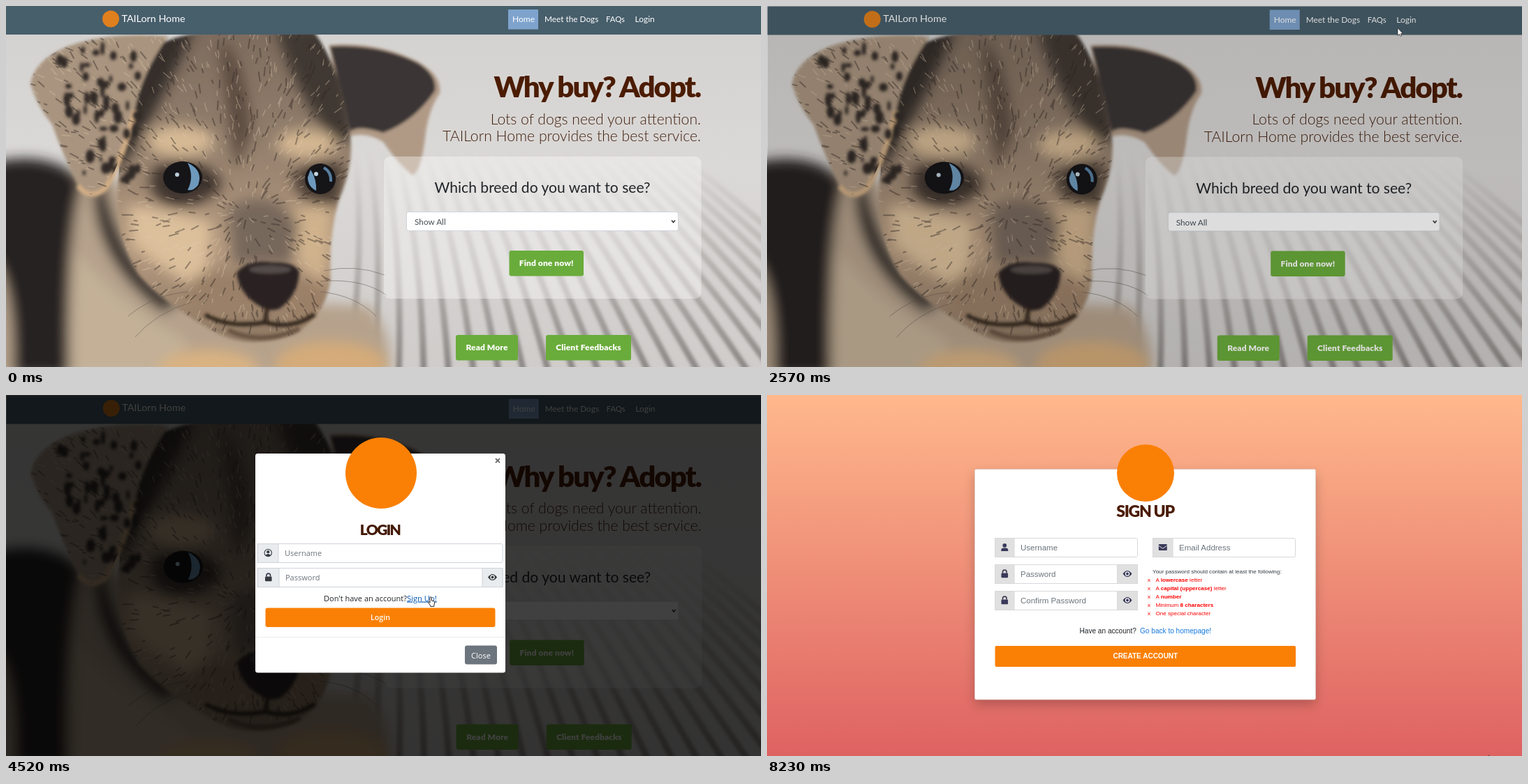
These frames come from a looping animation (1081 by 518 pixels, 8380 ms). An HTML page:

```html
<!DOCTYPE html>
<html lang="en">
<head>
<meta charset="utf-8">
<title>Dog adoption: log in and sign up</title>
<style>
html, body { margin: 0; width: 100%; height: 100%; overflow: hidden; background: #fff; }
svg { display: block; width: 100vw; height: 100vh; }
text { white-space: pre; }
.lato { font-family: Lato, sans-serif; }
.open { font-family: "Open Sans", "Noto Sans", sans-serif; font-size: 11px; }
.arial { font-family: "Liberation Sans", Arial, sans-serif; }
.mid { text-anchor: middle; }
.end { text-anchor: end; }
.black { font-weight: 900; }
</style>
</head>
<body>
<svg viewBox="0 0 1081 518" preserveAspectRatio="none">
  <defs>
    <linearGradient id="sunset" x2="0" y2="1"><stop stop-color="#ffb88c"/><stop offset="1" stop-color="#de6262"/></linearGradient>
    <linearGradient id="wall" x2="0" y2="1"><stop stop-color="#d3d1cf"/><stop offset=".45" stop-color="#dbd9d7"/><stop offset="1" stop-color="#cfccca"/></linearGradient>
    <linearGradient id="ridge" gradientUnits="userSpaceOnUse" x1="0" y1="210" x2="0" y2="518"><stop stop-color="#8d8783" stop-opacity="0"/><stop offset=".5" stop-color="#8d8783" stop-opacity=".4"/><stop offset="1" stop-color="#77716e" stop-opacity=".75"/></linearGradient>
    <linearGradient id="face" x2="0" y2="1"><stop stop-color="#7d6c5e"/><stop offset=".35" stop-color="#927e6c"/><stop offset=".7" stop-color="#b59a7f"/><stop offset="1" stop-color="#8d7763"/></linearGradient>
    <filter id="soft"><feGaussianBlur stdDeviation="2"/></filter>
    <filter id="haze" x="-30%" y="-30%" width="160%" height="160%"><feGaussianBlur stdDeviation="9"/></filter>
    <filter id="drop" x="-10%" y="-10%" width="120%" height="125%"><feDropShadow dx="0" dy="7" stdDeviation="8" flood-opacity=".22"/></filter>
    <path id="head" d="M205 62Q250 38 300 36H440Q480 90 492 180Q500 225 476 280Q462 330 465 390Q460 440 415 470Q350 495 300 468Q230 430 190 385Q150 320 162 240Q170 120 205 62Z"/>
    <path id="earL" d="M232 44Q150 36 88 58Q40 78 35 112Q45 145 66 170Q80 210 103 258Q120 280 142 262Q170 215 184 150Q195 95 232 44Z"/>
    <path id="earR" d="M462 56Q530 50 590 80Q625 100 621 125Q604 150 600 190Q594 238 582 243Q560 225 540 195Q515 180 493 187Q475 120 462 56Z"/>
    <clipPath id="fur"><use href="#head"/><use href="#earL"/></clipPath>
    <g id="person"><circle cy="-2.7" r="2.9"/><path d="M-5 5.5V4A3.5 3 0 0 1-1.5 1H1.5A3.5 3 0 0 1 5 4V5.5Z"/></g>
    <g id="badge"><circle r="5.2" fill="none" stroke="#343a40" stroke-width="1.1"/><circle cy="-1.3" r="2.1"/><path d="M-3.8 3.5Q0-.5 3.8 3.5Q0 7 -3.8 3.5Z"/></g>
    <g id="lock"><rect x="-4.8" y="-1" width="9.6" height="6.8" rx="1"/><path d="M-2.8-1V-2.6A2.8 2.8 0 0 1 2.8-2.6V-1" fill="none" stroke="#3c3c52" stroke-width="1.6"/></g>
    <g id="eye"><path d="M-6.5 0Q0-9 6.5 0Q0 9-6.5 0Z"/><circle r="3.2" fill="#fff"/><circle r="2"/></g>
    <g id="mail"><rect x="-6" y="-4.6" width="12" height="9.2" rx="1.2"/><path d="M-6-2.4L0 1.8L6-2.4" fill="none" stroke="#e0e0e0"/></g>
  </defs>

  <g id="home">
    <rect width="1083" height="519" fill="url(#wall)"/>
    <g id="ridges" fill="none" stroke="url(#ridge)" stroke-width="9" filter="url(#soft)"></g>

    <g id="dog">
      <g filter="url(#haze)">
        <path d="M-20 240Q60 230 150 240L290 420L520 430Q560 480 545 530H-20Z" fill="#b6a28c"/>
        <path d="M-20 225Q60 205 110 250Q85 330 90 530H10Q15 400-20 360Z" fill="#282423"/>
        <path d="M140 250Q165 380 250 425L225 440Q130 370 125 270Z" fill="#252120"/>
        <path d="M100 350Q160 430 260 480L250 530H95Z" fill="#c3b097"/>
      </g>
      <ellipse cx="465" cy="515" rx="80" ry="34" fill="#d4ab79" filter="url(#haze)"/>
      <ellipse cx="290" cy="521" rx="72" ry="28" fill="#d9b282" filter="url(#haze)"/>
      <g filter="url(#soft)">
        <use href="#earR" fill="#b09a86"/>
        <path d="M464 58Q535 54 590 82Q618 100 614 122Q585 165 540 182Q505 170 493 180Z" fill="#3b3634"/>
        <use href="#head" fill="url(#face)"/>
        <g clip-path="url(#fur)">
          <g filter="url(#haze)">
            <path d="M190 30H270Q235 115 180 210L150 250Z" fill="#362f2b"/>
            <path d="M385 30H475L500 190L470 195Q415 130 385 30Z" fill="#403731"/>
            <path d="M305 50Q340 60 352 180L330 235Q315 150 305 50Z" fill="#5b4b40"/>
            <ellipse cx="250" cy="194" rx="48" ry="23" fill="#d6b994"/>
            <ellipse cx="430" cy="198" rx="43" ry="20" fill="#d4b792"/>
            <path d="M215 230Q260 205 305 245Q320 265 270 285Q215 300 205 250Z" fill="#3f342e"/>
            <path d="M410 245Q440 210 485 230L476 285Q420 290 410 245Z" fill="#463a32"/>
            <path d="M175 285Q240 295 295 310L285 410Q230 385 180 340Z" fill="#dcc09b"/>
            <path d="M395 295Q440 285 468 290L455 400L420 370Z" fill="#d0b28d"/>
            <path d="M318 290Q375 255 420 310L410 370H325Z" fill="#77675b"/>
            <ellipse cx="310" cy="415" rx="55" ry="37" fill="#9a8068"/>
            <ellipse cx="430" cy="425" rx="32" ry="34" fill="#9b8067"/>
          </g>
        </g>
        <use href="#earL" fill="#a9947f"/>
        <path d="M184 150Q165 225 142 262Q120 280 103 258" fill="none" stroke="#d2ae85" stroke-width="7"/>
      </g>
      <g clip-path="url(#fur)" fill="none"><path id="darkFur" stroke="#302823" stroke-width="2" opacity=".42"/><path id="lightFur" stroke="#decab0" stroke-width="1.3" opacity=".4"/></g>
      <g id="spots" fill="#302926" clip-path="url(#fur)" filter="url(#soft)"></g>
      <g filter="url(#soft)">
        <path d="M330 383Q345 363 382 368Q415 367 420 382Q418 415 392 434Q378 440 364 431Q335 415 330 383Z" fill="#292321"/>
        <ellipse cx="378" cy="378" rx="30" ry="6" fill="#534b48"/>
        <path d="M374 432L371 452M285 443Q320 463 371 454Q410 465 442 442" fill="none" stroke="#33261f" stroke-width="6"/>
        <path d="M318 465Q365 488 420 463" fill="none" stroke="#66513f" stroke-width="6"/>
      </g>
      <g fill="#151417">
        <ellipse cx="253" cy="246" rx="28" ry="23"/><ellipse cx="450" cy="248" rx="22" ry="22"/>
        <path d="M260 225Q283 236 275 257Q268 266 260 264Q270 245 260 225Z" fill="#6d99bc"/>
        <path d="M436 235Q445 248 444 265Q432 259 432 246Z" fill="#6d99bc"/>
        <path d="M455 232Q466 238 465 252" fill="none" stroke="#587e9f" stroke-width="4"/>
        <circle cx="245" cy="242" r="3" fill="#b9ccd8"/><circle cx="444" cy="241" r="3" fill="#c3d5df"/>
      </g>
      <path d="M455 380Q500 370 542 386M450 395Q510 390 545 415M450 410Q500 415 530 445M260 410Q210 415 175 445M265 425Q215 440 185 475" fill="none" stroke="#5f554e" stroke-width=".8" opacity=".65"/>
    </g>

    <rect width="1083" height="41" fill="#475e6b"/>
    <circle cx="150" cy="18.5" r="12" fill="#e07f1d"/>
    <rect x="719" y="5" width="43" height="28.5" fill="#7ea3cd"/>
    <rect id="hover" x="894" y="5" width="40" height="28.5" fill="#6c7e89"/>
    <g class="lato" fill="#fff" font-size="12">
      <text x="165.5" y="22.5" font-size="14.3">TAILorn Home</text>
      <text x="725" y="23">Home</text><text x="771" y="23" font-size="11.8">Meet the Dogs</text>
      <text x="859" y="23" font-size="11.3">FAQs</text><text x="900.5" y="23">Login</text>
    </g>
    <rect x="541" y="216" width="454.5" height="204" rx="9" fill="#fff" opacity=".36"/>
    <g class="lato">
      <text class="end black" x="994" y="131" font-size="42" letter-spacing="-2" fill="#4b1c02">Why buy? Adopt.</text>
      <g class="end" font-size="21.2" font-weight="300" fill="#42200f">
        <text x="995" y="169.5">Lots of dogs need your attention.</text>
        <text x="995" y="194">TAILorn Home provides the best service.</text>
      </g>
      <text class="mid" x="768" y="268" font-size="21.1" fill="#212529">Which breed do you want to see?</text>
      <rect x="573.5" y="295.5" width="389" height="27" rx="3" fill="#fff" stroke="#ced4da"/>
      <text x="585" y="314" font-size="11.8" fill="#495057">Show All</text>
      <path d="M953 307.5L955.5 310.5L958 307.5" fill="none" stroke="#333" stroke-width="1.5"/>
    </g>
    <g id="greens"></g>
  </g>

  <rect id="shade" width="1081" height="518"/>

  <g id="modal" class="open">
    <rect x="357" y="84" width="358" height="314.5" rx="3.5" fill="#fff"/>
    <circle cx="537" cy="112" r="51" fill="#fa8005"/>
    <path d="M701 91.2L707 97.2M707 91.2L701 97.2" stroke="#666" stroke-width="1.7"/>
    <text class="lato mid black" x="535.5" y="201" font-size="21" letter-spacing="-1.7" fill="#431a05">LOGIN</text>
    <g id="modalFields"></g>
    <text x="455" y="295.5" fill="#212529">Don't have an account?</text>
    <text id="link" x="574" y="295.5" font-size="11.2">Sign Up!</text>
    <rect x="371.5" y="305.5" width="329" height="27.5" rx="3" fill="#fa8005"/>
    <text class="mid" x="536" y="323" font-size="10.6" font-weight="600" fill="#fff">Login</text>
    <path d="M357 347.5H715" stroke="#e9ecef"/>
    <rect x="657" y="359.5" width="46" height="27" rx="3" fill="#6c757d"/>
    <text class="mid" x="680" y="377.5" fill="#fff">Close</text>
  </g>

  <g id="signup" class="arial">
    <rect width="1081" height="518" fill="url(#sunset)"/>
    <rect x="297.5" y="106.5" width="488" height="330.5" rx="2" fill="#fff" stroke="#d9c9c6" stroke-width=".7" filter="url(#drop)"/>
    <circle cx="542" cy="112" r="41" fill="#fa8005"/>
    <text id="plainTitle" class="mid" x="541.7" y="175.3" font-size="26" fill="#3b1a0a" style="font-family:'Liberation Serif',serif">SIGN UP</text>
    <text id="boldTitle" class="lato mid black" x="541.5" y="175" font-size="23" letter-spacing="-1.3" fill="#4b1c02">SIGN UP</text>
    <g id="signupFields"></g>
    <text x="552" y="256" font-size="8.05" fill="#343a40">Your password should contain at least the following:</text>
    <g id="rules" font-size="8.1" fill="#f00"></g>
    <text x="447.5" y="341.5" font-size="10.1" fill="#212529">Have an account?</text>
    <text x="534" y="341.5" font-size="10.1" fill="#1679dc">Go back to homepage!</text>
    <rect x="326.5" y="360" width="430.5" height="30" rx="2" fill="#fa8005"/>
    <text class="mid" x="541.8" y="378.3" font-size="10" font-weight="700" fill="#fff">CREATE ACCOUNT</text>
  </g>

  <g id="cursor">
    <circle id="press" r="8.7" fill="#c5c518" opacity=".85"/>
    <path id="arrow" d="M0 0V11L2.5 8.7 4.2 12 5.8 11.3 4.3 8.2H7.5Z" fill="#fff" stroke="#222" stroke-width=".7"/>
    <path id="hand" d="M-1 1A1.2 1.2 0 0 1 1.4 1V5L5 6Q6 6.4 5.8 7.6L4.9 11.6V13.4H-.3V12.2L-3.3 8.2Q-3.9 6.9-2.5 6.8L-1 8.1Z" fill="#fff" stroke="#111" stroke-width=".9"/>
  </g>
</svg>
<script>
const LOOP = 8380;
const el = id => document.getElementById(id);
const clamp = v => Math.min(1, Math.max(0, v));
const fade = (t, from, to) => clamp((t - from) / (to - from));
const show = (id, on) => { el(id).style.display = on ? '' : 'none'; };

let seed = 7;
const rand = () => (seed = seed * 16807 % 2147483647) / 2147483647;

function drawPhoto() {
  el('ridges').innerHTML = Array.from({ length: 24 }, (_, i) =>
    `<path d="M${500 + i * 20} 210Q${515 + i * 27} 350 ${490 + i * 36} 530"/>`).join('');

  // Hair runs outward from the middle of the face.
  const hairs = (count, length) => Array.from({ length: count }, () => {
    const x = 40 + rand() * 450, y = 42 + rand() * 430;
    const angle = Math.atan2(y - 300, x - 345) + (rand() - .5) * .7;
    const reach = length * (.5 + rand());
    return `M${x.toFixed(1)} ${y.toFixed(1)}l${(reach * Math.cos(angle)).toFixed(1)} ${(reach * Math.sin(angle)).toFixed(1)}`;
  }).join('');
  el('darkFur').setAttribute('d', hairs(600, 10));
  el('lightFur').setAttribute('d', hairs(600, 9));

  el('spots').innerHTML = Array.from({ length: 60 }, () => {
    const y = 55 + rand() * 195, x = 40 + y * .3 + rand() * (150 - y * .3);
    return `<ellipse cx="${x}" cy="${y}" rx="${2 + rand() * 5}" ry="${3 + rand() * 8}"/>`;
  }).join('');
}

function button(x, y, w, label) {
  return `<rect x="${x}" y="${y}" width="${w}" height="36.5" rx="3" fill="#6aac3b"/>
    <text class="lato mid black" x="${x + w / 2}" y="${y + 22}" font-size="12" letter-spacing=".1" fill="#fff">${label}</text>`;
}

function field({ x, y, w, addon, icon, label, size, eye, grey, ink, line }) {
  const h = 27, mid = y + 13.5;
  const tile = (left, width, name) =>
    `<rect x="${left}" y="${y}" width="${width}" height="${h}" fill="${grey}" stroke="${line}"/>
     <use href="#${name}" x="${left + width / 2}" y="${mid - .5}" fill="${ink}"/>`;
  return `<rect x="${x}" y="${y}" width="${w}" height="${h}" rx="2" fill="#fff" stroke="${line}"/>
    ${tile(x, addon, icon)}${eye ? tile(x + w - 29, 29, 'eye') : ''}
    <text x="${x + addon + 9}" y="${mid + 4}" font-size="${size}" fill="#6c757d">${label}</text>`;
}

function buildForms() {
  el('greens').innerHTML = button(720.5, 351, 106.5, 'Find one now!')
    + button(644, 472, 89, 'Read More') + button(773, 472, 122, 'Client Feedbacks');

  const modal = { x: 360.5, w: 350.5, size: 11, grey: '#e9ecef', ink: '#343a40', line: '#ced4da' };
  el('modalFields').innerHTML = [
    { y: 213.5, addon: 29.5, icon: 'badge', label: 'Username' },
    { y: 248.5, addon: 30.5, icon: 'lock', label: 'Password', eye: true }
  ].map(f => field({ ...modal, ...f })).join('');

  const page = { x: 326.5, w: 204, addon: 27.5, size: 11.5, grey: '#e0e0e0', ink: '#39395a', line: '#d8d8dc' };
  el('signupFields').innerHTML = [
    { y: 205.5, icon: 'person', label: 'Username' },
    { x: 552.5, y: 205.5, addon: 28.5, icon: 'mail', label: 'Email Address' },
    { y: 243.5, icon: 'lock', label: 'Password', eye: true },
    { y: 281.5, icon: 'lock', label: 'Confirm Password', eye: true }
  ].map(f => field({ ...page, ...f })).join('');

  const bold = s => `<tspan font-weight="700">${s}</tspan>`;
  el('rules').innerHTML = [
    `A ${bold('lowercase')} letter`, `A ${bold('capital (uppercase)')} letter`, `A ${bold('number')}`,
    `Minimum ${bold('8 characters')}`, 'One special character'
  ].map((rule, i) => `<text x="545" y="${268 + i * 12}">x</text><text x="556.5" y="${268 + i * 12}">${rule}</text>`).join('');
}

// Each move: first change, last change, steps, end point, optional bend point.
const START = [963, 458];
const MOVES = [
  [720, 790, 2, [907, 238]],
  [1100, 1870, 11, [903, 34], [817, 110]],
  [1960, 1960, 1, [903, 31.5]],
  [2970, 3350, 6, [711, 266]],
  [3660, 4200, 8, [608, 290], [650, 266]],
  [6600, 6680, 2, [905, 437]],
  [7060, 7680, 9, [1011, 520]],
  [8230, 8230, 1, [1033.5, 516.8]]
];

function cursorAt(t) {
  let pos = START;
  for (const [from, to, steps, end, bend] of MOVES) {
    if (t < from) break;
    const k = to > from ? Math.floor(clamp((t - from) / (to - from)) * (steps - 1) + 1e-6) + 1 : steps;
    const p = k / steps, q = 1 - p;
    const begin = pos;
    const via = bend || begin.map((v, i) => (v + end[i]) / 2);
    pos = begin.map((v, i) => q * q * v + 2 * q * p * via[i] + p * p * end[i]);
    if (t < to) break;
  }
  return pos;
}

function render(t) {
  const dimmed = t >= 2570, signup = t >= 5510;
  show('home', !signup);
  show('shade', dimmed && !signup);
  show('modal', t >= 2740 && !signup);
  show('signup', signup);
  show('plainTitle', t < 5760);
  show('boldTitle', t >= 5760);

  el('home').setAttribute('transform', dimmed ? 'translate(.7 .5)' : '');
  el('hover').style.opacity = dimmed ? 0 : fade(t, 1930, 2200);
  el('shade').style.opacity = .75 * fade(t, 2545, 2690);
  el('modal').style.opacity = fade(t, 2740, 2880);
  const slide = 1 - fade(t, 2770, 3110);
  el('modal').setAttribute('transform', `translate(0 ${(-35 * slide ** 1.8).toFixed(2)})`);

  const onLink = t >= 4120;
  el('link').setAttribute('fill', onLink ? '#0056b3' : '#007bff');
  el('link').setAttribute('text-decoration', onLink ? 'underline' : 'none');

  const hand = (t >= 1960 && t < 2570) || (onLink && t < 6600);
  show('cursor', t >= 720);
  show('hand', hand);
  show('arrow', !hand);
  show('press', (t >= 2420 && t < 2570) || (t >= 4350 && t < 4520));
  el('cursor').setAttribute('transform', `translate(${cursorAt(t)})`);
}

drawPhoto();
buildForms();
const begin = performance.now();
function tick() {
  render((performance.now() - begin) % LOOP);
  requestAnimationFrame(tick);
}
tick();
</script>
</body>
</html>
```
